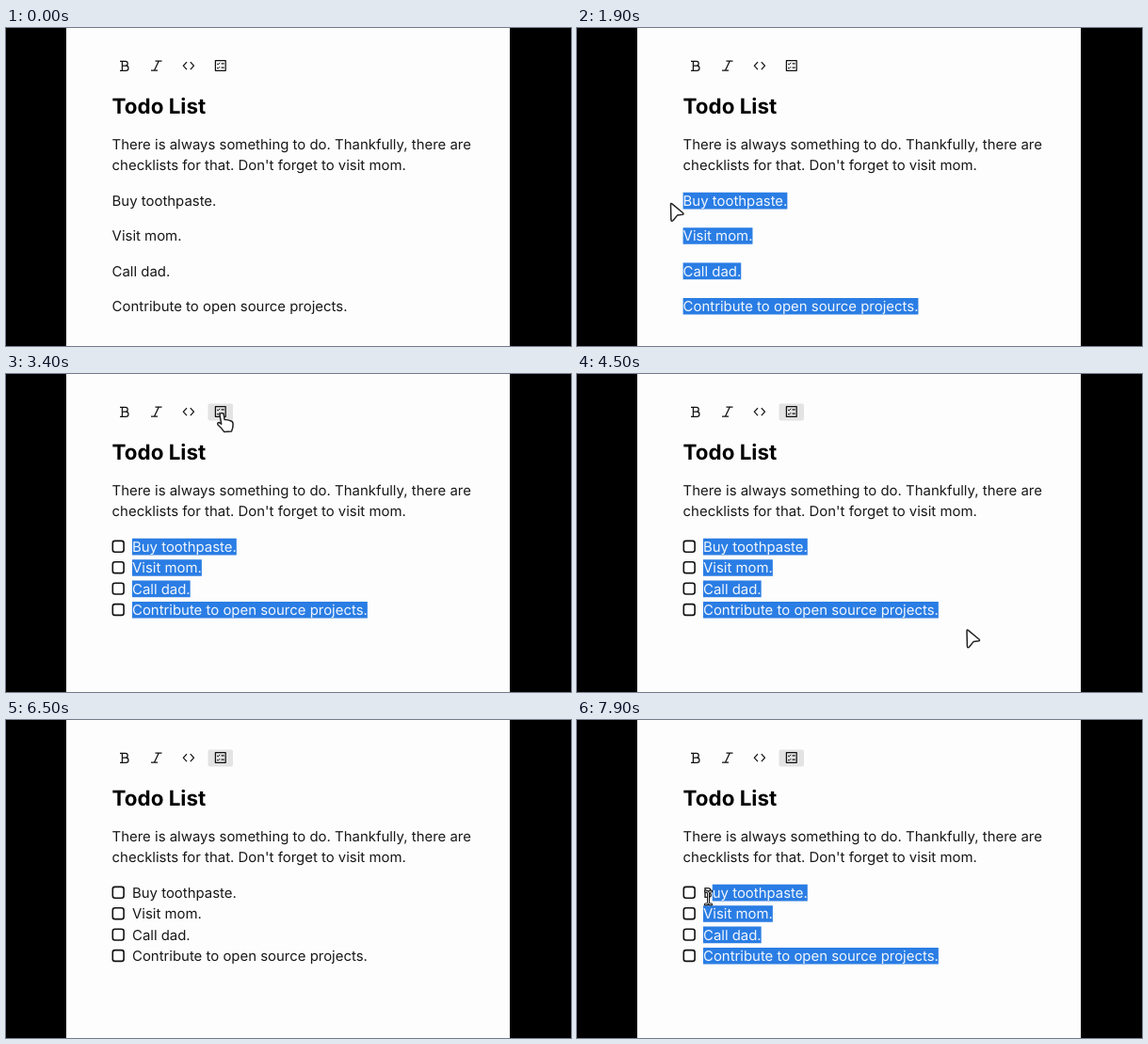
An HTML page that plays this animation: 600x338 px, repeating every 8 s.

```html
<!DOCTYPE html>
<html lang="en">
<head>
<meta charset="utf-8">
<title>Todo List</title>
<style>
  html, body { margin: 0; width: 100%; height: 100%; overflow: hidden; background: #000; }
  svg { display: block; width: 100%; height: 100%; }
  text { font: 14.93px Inter, sans-serif; white-space: pre; text-rendering: geometricPrecision; }
  .title { font-size: 22.4px; font-weight: 700; }
  .icon { fill: none; stroke: #111; stroke-width: 1.25; stroke-linejoin: round; }
  .pointer { fill: #fff; stroke: #222; stroke-width: 1.5; stroke-linejoin: round; }
</style>
</head>
<body>
<svg viewBox="0 0 600 338">
  <defs>
    <clipPath id="sel"></clipPath>
    <path id="beam" d="M-3.2 -7 Q0 -7 0 -5 V5 Q0 7 -3.2 7 M3.2 -7 Q0 -7 0 -5 V5 Q0 7 3.2 7"/>
  </defs>
  <rect width="600" height="338"/>
  <rect x="64" width="471" height="338" fill="#fdfdfd"/>

  <rect id="active" x="214.5" y="31.5" width="26.5" height="18" rx="2" fill="#e3e3e3"/>
  <g class="icon">
    <path d="M121 35.4 H126.8 A2.4 2.4 0 0 1 126.8 40.2 H123.4 M126.8 40.2 H127.4 A2.55 2.55 0 0 1 127.4 45.3 H121 M123.4 35.4 V45.3"/>
    <path d="M158.5 35.2 H165.5 M154 45.2 H161 M162.2 35.2 L157.4 45.2"/>
    <path d="M192 36.1 L188.3 40.1 L192 44.1 M195.8 36.1 L199.5 40.1 L195.8 44.1"/>
    <path d="M222.4 34.7 H233.2 V45.3 H222.4 Z M228.6 37.9 H231.7 M228.6 42.2 H231.7"/>
    <path d="M224 37.8 L225.2 38.9 L227.2 36.8 M224 42.1 L225.2 43.2 L227.2 41.1" stroke-width="1"/>
  </g>

  <g fill="#181818">
    <text class="title" x="112.6" y="90.5" fill="#000">Todo List</text>
    <text x="112.6" y="128.9">There is always something to do. Thankfully, there are</text>
    <text x="112.6" y="151.3">checklists for that. Don't forget to visit mom.</text>
    <g id="items"></g>
  </g>
  <g id="boxes" fill="#fff" stroke="#111" stroke-width="1.6"></g>
  <g clip-path="url(#sel)">
    <rect width="600" height="338" fill="#2a7de4"/>
    <g id="lit" fill="#f1f6fd"></g>
  </g>
  <path id="caret" d="M363.5 288 V303.5" stroke="#111"/>

  <g id="cursor">
    <path id="arrow" class="pointer" d="M1 2 Q1 .2 2.4 1.3 L14 11 Q15.2 12.4 13.4 12.8 L8 13.6 L3.6 19 Q1.6 20.8 1.4 18.4 Z"/>
    <path id="hand" class="pointer" d="M-2 1.5 Q-2 -.4 0 -.4 Q2 -.4 2.3 1.5 L3 6.4 Q7 6.3 9.5 7.8 Q12 8.4 12.1 11 Q12.3 15 10.5 19 L2.6 19.4 Q0 15.4 -4 12 Q-5 9.5 -2.5 9.6 L-.3 11.2 Z"/>
    <g id="ibeam" fill="none" stroke-linecap="round">
      <use href="#beam" stroke="#1a1a1a" stroke-width="3"/>
      <use href="#beam" stroke="#ddd" stroke-width=".9"/>
    </g>
  </g>
</svg>
<script>
const LOOP = 8000, STEP = 100, LINE = 22.4, TOP = 188.8;
const ITEMS = ['Buy toothpaste.', 'Visit mom.', 'Call dad.', 'Contribute to open source projects.'];

// Pointer hotspot: time, x, y
const PATH = [
  [300, 409, 322], [700, 395.5, 291], [800, 395.5, 291], [1000, 360, 288],
  [1700, 102.5, 188], [1800, 98.5, 185.5], [1900, 98.5, 185.5],
  [2600, 230, 45], [2800, 229, 42], [3400, 229, 42],
  [3800, 451, 205], [4000, 413.5, 284], [4500, 413, 271], [4800, 413, 288],
  [5000, 413, 288], [5700, 434, 342], [6600, 429.5, 289],
  [7000, 397, 256], [7200, 397, 256], [7900, 139.5, 189]
];

const $ = id => document.getElementById(id);
const show = (el, on) => el.setAttribute('visibility', on ? 'visible' : 'hidden');
const between = (t, a, b) => t >= a && t < b;

function add(parent, tag, attrs, label) {
  const el = document.createElementNS('http://www.w3.org/2000/svg', tag);
  set(el, attrs);
  if (label) el.textContent = label;
  parent.appendChild(el);
  return el;
}

function set(el, attrs) {
  for (const key in attrs) el.setAttribute(key, attrs[key]);
}

const rows = ITEMS.map((label, i) => {
  add($('boxes'), 'rect', { x: 113.3, y: TOP - 11.4 + i * LINE, width: 11.8, height: 11.8, rx: 2.4 });
  return {
    text: add($('items'), 'text', {}, label),
    lit: add($('lit'), 'text', {}, label),
    mark: add($('sel'), 'rect', { height: 17.6 })
  };
});

function pointerAt(t) {
  const i = PATH.findIndex(key => key[0] > t);
  if (i < 0) return PATH[PATH.length - 1].slice(1);
  if (i === 0) return PATH[0].slice(1);
  const [t0, x0, y0] = PATH[i - 1], [t1, x1, y1] = PATH[i];
  const u = (t - t0) / (t1 - t0), e = u * u * (3 - 2 * u);
  return [x0 + (x1 - x0) * e, y0 + (y1 - y0) * e];
}

// Left edge of the nearest character boundary
function snap(text, x) {
  for (let i = 0; i < text.getNumberOfChars(); i++) {
    const a = text.getStartPositionOfChar(i).x, b = text.getEndPositionOfChar(i).x;
    if (x < (a + b) / 2) return a;
  }
  return text.getEndPositionOfChar(text.getNumberOfChars() - 1).x;
}

function render(t) {
  const list = t >= 3200;
  const left = list ? 134 : 112.6, gap = list ? LINE : 37.4;
  const [x, y] = pointerAt(t);
  const drag = between(t, 1100, 1800) || t >= 7300;
  const all = between(t, 1800, 5000);
  const focus = Math.max(0, Math.min(3, Math.round((y - TOP + 5.5) / gap)));

  rows.forEach(({ text, lit, mark }, i) => {
    const base = TOP + i * gap;
    set(text, { x: left, y: base });
    set(lit, { x: left, y: base });
    const end = left + text.getComputedTextLength();
    let start = end;
    if (all || (drag && i > focus)) start = left;
    else if (drag && i === focus) start = snap(text, x);
    set(mark, { x: start, y: base - 14, width: Math.max(0, end - start) });
  });

  show($('boxes'), list);
  show($('active'), list);
  show($('caret'), between(t, 1000, 1100));

  const visible = between(t, 300, 5800) || t >= 6600;
  const overButton = between(x, 214, 241) && between(y, 31, 50);
  const overText = x > 112 && between(y, 70, list ? 262 : 307);
  const kind = overButton ? 'hand' : drag || overText ? 'ibeam' : 'arrow';
  for (const id of ['arrow', 'hand', 'ibeam']) show($(id), visible && id === kind);
  $('cursor').setAttribute('transform', `translate(${x} ${y})`);
}

const origin = performance.now();
function tick() {
  const t = (performance.now() - origin) % LOOP;
  render(Math.floor(t / STEP) * STEP);
  requestAnimationFrame(tick);
}
render(0);
requestAnimationFrame(tick);
</script>
</body>
</html>
```
